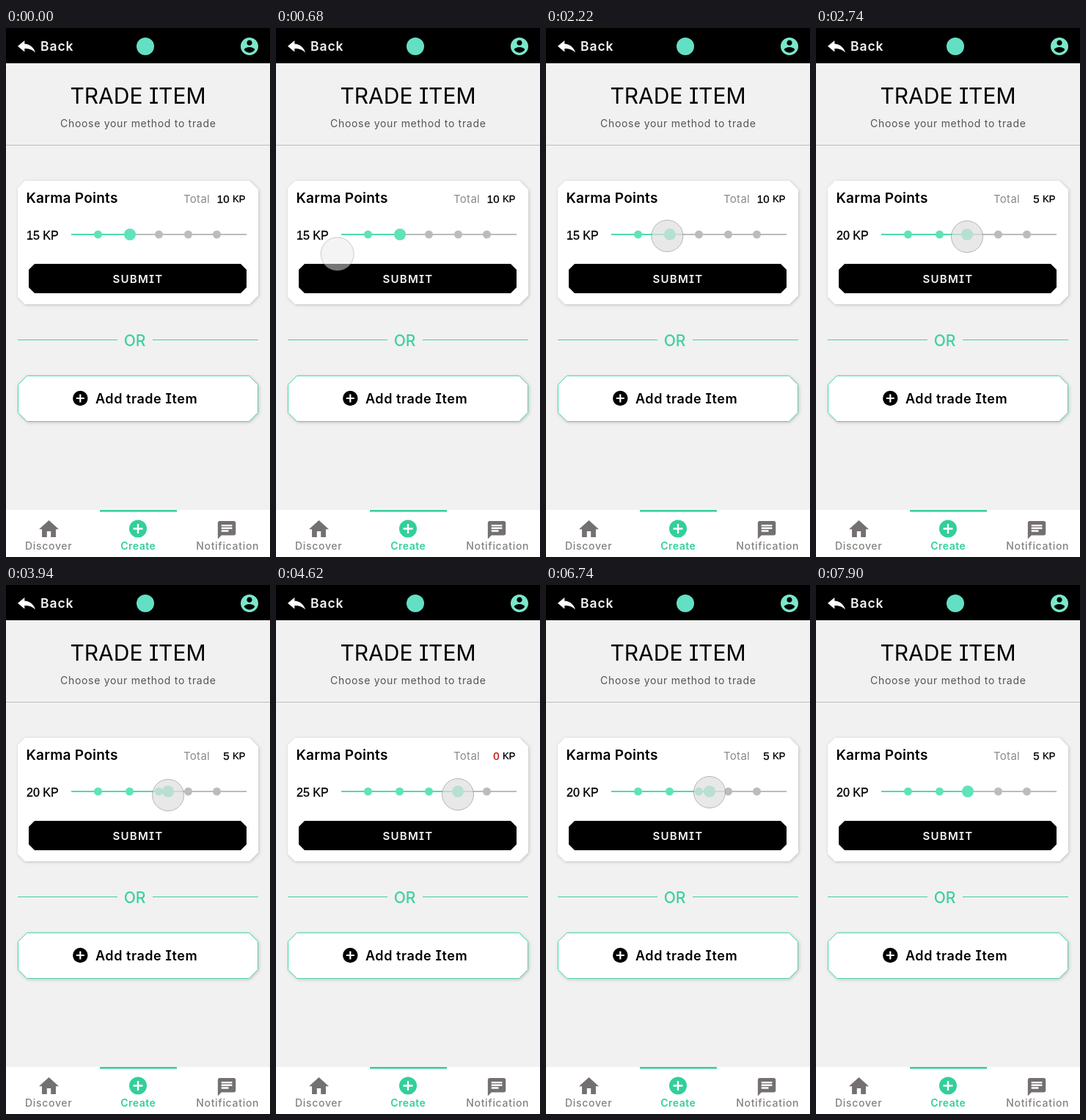
An HTML page for the animation above (8 s loop, 360 by 720 pixels).

```html
<!DOCTYPE html>
<html lang="en">
<head>
<meta charset="utf-8">
<title>Trade item</title>
<style>
  html, body { margin: 0; width: 100%; height: 100%; overflow: hidden; background: #f1f1f1; }
  svg { display: block; width: 360px; height: 720px; }
  text { font-family: Inter, "Noto Sans", sans-serif; font-feature-settings: "cv08"; white-space: pre; }
  .mid { text-anchor: middle; }
  .num { font-family: "Liberation Sans", Arial, sans-serif; stroke: currentColor; stroke-width: .35; fill: currentColor; }
  .semi { font-weight: 600; }
  .med { font-weight: 500; }
  .card { filter: drop-shadow(1px 1px 2px rgba(0, 0, 0, .2)); }
</style>
</head>
<body>
<svg viewBox="0 0 360 720">
  <rect width="360" height="720" fill="#f1f1f1"/>

  <!-- header -->
  <rect width="360" height="48" fill="#000"/>
  <path transform="translate(12 11.5) scale(1.33 1.1)" fill="#fff" d="M10 9V5l-7 7 7 7v-4.1c5 0 8.5 1.6 11 5.1-1-5-4-10-11-11z"/>
  <text class="semi" x="47" y="31" font-size="17.5" letter-spacing=".9" fill="#f4f4f4">Back</text>
  <circle cx="190" cy="25" r="12" fill="#63e0c4"/>
  <path transform="translate(317.6 10.6) scale(1.2)" fill="#7be6ca" d="M12 2C6.48 2 2 6.48 2 12s4.48 10 10 10 10-4.48 10-10S17.52 2 12 2zm0 3c1.66 0 3 1.34 3 3s-1.34 3-3 3-3-1.34-3-3 1.34-3 3-3zm0 14.2c-2.5 0-4.71-1.28-6-3.22.03-1.99 4-3.08 6-3.08 1.99 0 5.97 1.09 6 3.08-1.29 1.94-3.5 3.22-6 3.22z"/>

  <text class="mid" x="180" y="103.3" font-size="30">TRADE ITEM</text>
  <text class="mid" x="180.3" y="135" font-size="14" letter-spacing=".7" fill="#555">Choose your method to trade</text>
  <path d="M0 159.5H360" stroke="#bdbdbd"/>

  <!-- points card -->
  <path class="card" fill="#fff" d="M26 208H332L344 220V364L332 376H26L16 366V218Z"/>
  <text class="semi" x="27.5" y="237.7" font-size="19" letter-spacing=".25">Karma Points</text>
  <text x="242" y="237.5" font-size="15" letter-spacing=".3" fill="#8a8a8a">Total</text>
  <text class="num" id="total" x="304.5" y="238" font-size="15" text-anchor="end">10</text>
  <text class="num" x="309" y="236.5" font-size="13">KP</text>
  <text class="num" id="points" x="28" y="288" font-size="16">15 KP</text>
  <g transform="translate(0 281)">
    <path d="M89 0H328" stroke="#bcbcbc" stroke-width="2"/>
    <path id="fill" stroke="#4fdcae" stroke-width="2"/>
    <g id="dots"></g>
    <circle id="knob" r="8" fill="#5fe3ba"/>
  </g>
  <path d="M39 321H320L328 329V353L320 361H39L31 353V329Z"/>
  <text class="mid semi" x="180" y="346.5" font-size="15" letter-spacing="1.25" fill="#f4f4f4">SUBMIT</text>

  <path d="M16 424.5H152M200 424.5H344" stroke="#3fd0a0"/>
  <text class="mid med" x="175.5" y="432.7" font-size="21" fill="#3fd0a0">OR</text>

  <!-- add button -->
  <path class="card" fill="#fff" stroke="#4fd8ac" d="M28.5 473.5H331.5L343.5 485.5V523.5L331.5 535.5H28.5L16.5 523.5V485.5Z"/>
  <circle cx="101.3" cy="504" r="10.2"/>
  <path d="M95.8 504H106.8M101.3 498.5V509.5" stroke="#fff" stroke-width="2.2"/>
  <text class="semi" x="122" y="511" font-size="18" letter-spacing=".55">Add trade Item</text>

  <!-- tab bar -->
  <rect y="656" width="360" height="64" fill="#fff"/>
  <rect x="128" y="656" width="105" height="2.5" fill="#33cf9b"/>
  <g fill="#757070">
    <path transform="translate(42.3 666) scale(1.35)" d="M10 20v-6h4v6h5v-8h3L12 3 2 12h3v8z"/>
    <path transform="translate(286.4 668.6) scale(1.22)" d="M20 2H4c-1.1 0-2 .9-2 2v18l4-4h14c1.1 0 2-.9 2-2V4c0-1.1-.9-2-2-2zM6 9h12v2H6V9zm8 5H6v-2h8v2zm4-6H6V6h12v2z"/>
  </g>
  <circle cx="180" cy="681.5" r="12" fill="#33cf9b"/>
  <path d="M173.5 681.5H186.5M180 675V688" stroke="#fff" stroke-width="2.4"/>
  <g class="mid" font-size="14" letter-spacing=".7">
    <text class="med" x="58.2" y="710" fill="#858181">Discover</text>
    <text class="semi" x="180.3" y="709.7" letter-spacing=".5" fill="#33cf9b">Create</text>
    <text class="med" x="302.2" y="710" fill="#858181">Notification</text>
  </g>

  <circle id="cursor"/>
</svg>
<script>
const LOOP = 8000;
const START = performance.now();
const DRAG = [2200, 7380], PRESS = [2000, 7600], SHOWN = [500, 7900];
const STOPS = [125.5, 168.5, 208.5, 248.5, 287.5];

// Pointer path: time, x, y
const PATH = [
  [480, -26, 303], [640, 66, 307.5], [800, 123, 307.5], [1020, 156, 297],
  [1280, 163.5, 284.5], [1360, 164, 283], [1480, 164, 283], [1500, 165, 283],
  [2200, 165, 283], [2440, 188, 283], [2740, 206, 284],
  [3740, 206, 284], [3940, 221, 286], [4200, 238, 286], [4620, 248, 285],
  [6160, 248, 285], [6740, 223, 282], [6980, 215, 281.6], [7380, 207, 281.5],
  [7720, 207, 281.5], [7800, 247, 270], [7880, 350, 249], [7900, 390, 245]
];

const $ = id => document.getElementById(id);
const set = (el, attrs) => { for (const k in attrs) el.setAttribute(k, attrs[k]); };
const within = (t, [a, b]) => t >= a && t < b;

const dots = STOPS.map(x => {
  const dot = document.createElementNS("http://www.w3.org/2000/svg", "circle");
  set(dot, { cx: x, r: 5.5 });
  return $("dots").appendChild(dot);
});

const slope = (i, k) => (PATH[i + 1][k] - PATH[i][k]) / (PATH[i + 1][0] - PATH[i][0]);

function tangent(i, k) {
  if (i === 0) return slope(0, k);
  if (i === PATH.length - 1) return slope(i - 1, k);
  const a = slope(i - 1, k), b = slope(i, k);
  return a * b > 0 ? 2 * a * b / (a + b) : 0;
}

// Monotone cubic through the path, so holds stay still
function at(t, k) {
  const last = PATH.length - 1;
  if (t <= PATH[0][0]) return PATH[0][k];
  if (t >= PATH[last][0]) return PATH[last][k];
  let i = 0;
  while (t >= PATH[i + 1][0]) i++;
  const h = PATH[i + 1][0] - PATH[i][0];
  const u = (t - PATH[i][0]) / h, v = 1 - u;
  return v * v * (1 + 2 * u) * PATH[i][k] + u * u * (3 - 2 * u) * PATH[i + 1][k]
    + h * u * v * (v * tangent(i, k) - u * tangent(i + 1, k));
}

function draw(t) {
  const x = at(t, 1), y = at(t, 2);
  const knob = t < DRAG[0] ? 169 : t > DRAG[1] ? 207 : Math.max(169, x);
  const level = knob < 188.5 ? 0 : knob < 228.5 ? 1 : 2;
  const pressed = within(t, PRESS);

  $("points").textContent = `${15 + 5 * level} KP`;
  $("total").textContent = 10 - 5 * level;
  $("total").style.color = level === 2 ? "#c01818" : "#000";
  set($("fill"), { d: `M89 0H${knob}` });
  set($("knob"), { cx: knob });
  dots.forEach((dot, i) => set(dot, { fill: STOPS[i] < knob ? "#5fe3ba" : "#bcbcbc" }));
  set($("cursor"), {
    cx: x, cy: y, r: pressed ? 21.5 : 22.5,
    fill: pressed ? "rgba(222,222,222,.7)" : "rgba(234,234,234,.5)",
    stroke: pressed ? "rgba(140,140,140,.6)" : "rgba(150,150,150,.45)",
    visibility: within(t, SHOWN) ? "visible" : "hidden"
  });
}

function tick() {
  draw((performance.now() - START) % LOOP);
  requestAnimationFrame(tick);
}
tick();
</script>
</body>
</html>
```
